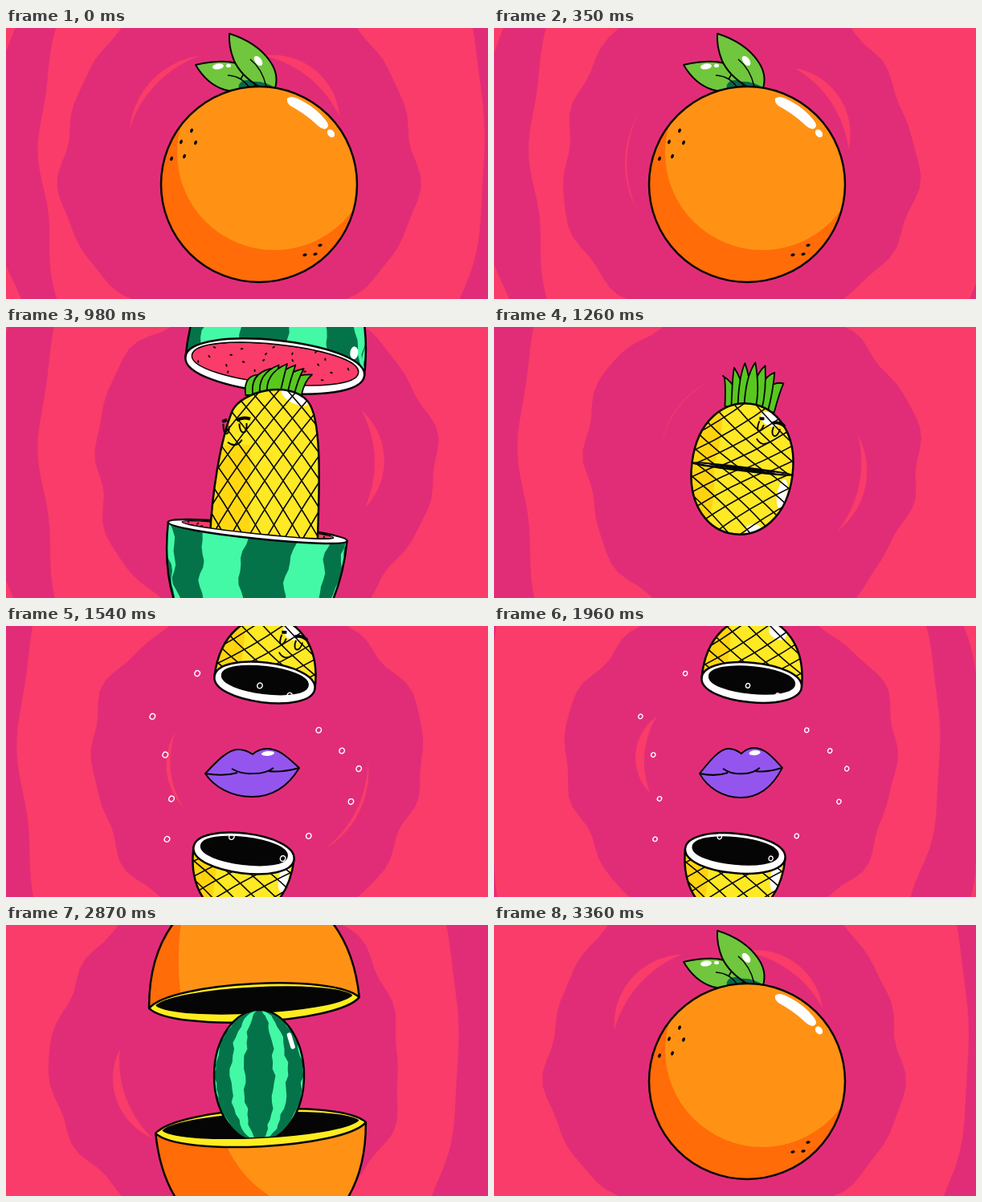
An HTML page with a canvas for the animation above (3.43 s loop, 600x338 px).

```html
<!DOCTYPE html>
<html lang="en">
<head>
<meta charset="utf-8">
<title>Fruit inside fruit</title>
<style>
html, body { margin: 0; width: 100%; height: 100%; overflow: hidden; background: #e12d78; }
canvas { display: block; width: 100vw; height: 100vh; }
</style>
</head>
<body>
<canvas id="stage" width="600" height="338"></canvas>
<script>
const c = document.getElementById('stage').getContext('2d');
const STEP = 70, STEPS = 49, TURN = Math.PI * 2;
const PINK = '#e12d78', CORAL = '#f93c69', INK = '#050505';
const MINT = '#43f9a6', PINE = '#05734a', YELLOW = '#ffe824', AMBER = '#ff9214', RUST = '#ff6c08';
const rad = deg => deg * Math.PI / 180;
const lerp = (a, b, k) => a + (b - a) * k;
const clamp = (v, lo, hi) => Math.max(lo, Math.min(hi, v));
const within = (s, a, b) => s >= a && s < b;
const noise = n => { const v = Math.sin(n * 127.1) * 43758.5; return v - Math.floor(v); };

function at(x, y, deg, draw, sx = 1, sy = sx) {
  c.save();
  c.translate(x, y);
  c.rotate(rad(deg));
  c.scale(sx, sy);
  draw();
  c.restore();
}
function paint(path, fill, width = 2.5, line = INK) {
  if (fill) { c.fillStyle = fill; c.fill(path); }
  if (width) { c.lineWidth = width; c.strokeStyle = line; c.stroke(path); }
}
function oval(x, y, rx, ry, fill, deg = 0) {
  const p = new Path2D();
  p.ellipse(x, y, rx, ry, rad(deg), 0, TURN);
  paint(p, fill, 0);
}
function clipped(path, draw) {
  c.save();
  c.clip(path);
  draw();
  c.restore();
}
const ink = (d, width = 2, line = INK) => paint(new Path2D(d), null, width, line);

/* Background: a drifting disc, two widening crescents and two flames */
const wave = (a, seed) => 5 * Math.sin(a * 5 + seed) + 3 * Math.sin(a * 11 + seed * 2) + 2 * Math.sin(a * 17 - seed);

function ring(p, x, r, tall, from, to, seed) {
  for (let i = 0; i <= 90; i++) {
    const a = lerp(from, to, i / 90), q = r + wave(a, seed);
    p.lineTo(x + q * Math.cos(a), 169 + q * tall * Math.sin(a));
  }
}
function flame(x, r, deg, w) {
  if (w <= 0) return;
  const p = new Path2D();
  for (let i = -20; i <= 20; i++) p.lineTo(...polar(x, r + w * (1 - i * i / 400), deg + i * 1.3));
  for (let i = 20; i >= -20; i--) p.lineTo(...polar(x, r, deg + i * 1.3));
  paint(p, CORAL, 0);
}
const polar = (x, r, deg) => [x + r * Math.cos(rad(deg)), 169 + r * Math.sin(rad(deg))];

function background(s) {
  const spin = s / STEPS * TURN, x = 298 + 23 * Math.cos(spin - 1.92);
  c.fillStyle = CORAL;
  c.fillRect(0, 0, 600, 338);
  for (const side of [0, 1]) {
    const age = (s + STEPS - 24 * side) % STEPS, mid = side ? 0 : Math.PI;
    const p = new Path2D();
    ring(p, x, 250 + 2.2 * age, 1.5, mid - 1, mid + 1, 2 + side);
    ring(p, x, 305 + 2.5 * age, 1.35, mid + 1, mid - 1, 4 + side);
    paint(p, PINK, 0);
  }
  const disc = new Path2D();
  ring(disc, x, 213 + 8 * Math.cos(spin), 1, 0, TURN, spin);
  paint(disc, PINK, 0);
  flame(x, 125 + 18 * Math.cos(spin), 192 + 32 * Math.cos(spin * 3), clamp(Math.abs(s - 12) - 5, 0, 12));
  const t = (s + 2) % STEPS;
  flame(x, 138, -58 + 3.5 * t, clamp(28 - t, 0, 12));
}

/* Shared decoration */
function stripes(w, d, lat0, turn, gap, half) {
  for (let k = -1; k < 3; k++) {
    const p = new Path2D(), n = 30;
    for (const side of [-1, 1])
      for (let i = 0; i <= n; i++) {
        const lat = lerp(lat0, 90, side < 0 ? i / n : 1 - i / n);
        const lon = clamp(turn + k * gap + side * half, -90, 90);
        const jag = w * .03 * (Math.sin(lat * .21 + k * 2 + side) + .6 * Math.sin(lat * .47 + k));
        p.lineTo((w * Math.sin(rad(lon)) + jag) * Math.cos(rad(lat)), d * Math.sin(rad(lat)));
      }
    paint(p, MINT, 0);
  }
}
function lattice(w, top, bottom, slope, gap) {
  const h = bottom - top, run = h / slope;
  for (let x = -w - run; x < w + run; x += gap)
    for (const m of [1, -1])
      ink(`M${m * x} ${top}Q${m * (x + run * .58)} ${top + h * .44} ${m * (x + run)} ${bottom}`, 1.6);
}
function crown(x, y, span, size, lean, fan) {
  for (const i of [0, 6, 1, 5, 2, 4, 3]) {
    const k = i / 3 - 1, bx = x + k * span / 2, b = span / 7;
    const tx = bx + lean + k * fan, ty = y - size * (1.1 - .45 * k * k);
    paint(new Path2D(`M${bx - b} ${y + 6}Q${bx - b * 1.5} ${y - size * .7} ${tx} ${ty}` +
      `Q${bx + b * 1.5} ${y - size * .4} ${bx + b} ${y + 6}Z`), '#58c81f', 1.8);
  }
}
function face(x, y, k, deg) {
  at(x, y, deg, () => {
    ink('M-15 -12L-9 -14M3 -12Q10 -17 20 -13', 4);
    ink('M-14 -9C-15 7 -7 7 -7 -6M6 -8C5 7 16 7 15 -8M-10 14Q0 23 8 12', 2);
  }, k);
}

/* Shells hang toward +y and are flipped for tops */
const shells = {
  orange: {
    open: 7, shut: 43, speed: 78, reach: 500, x: [320, 313], y: 175, eye: 176, view: .0023,
    wide: [118, 131], tilt: [-12, -3], rim: '#ffed1f', pit: INK, lens: .78, depth: 1.15, bulge: .93, skin: RUST,
    deco(w, d, up) {
      if (up) oval(.27 * w, .3 * w, .97 * w, 1.6 * w, AMBER);
      else oval(.67 * w, -.22 * w, 1.07 * w, 1.07 * w, AMBER);
    }
  },
  melon: {
    open: 12, shut: 38, speed: 103, reach: 500, x: [324, 315], y: 152, eye: 210, view: .0018,
    wide: [112, 60], tilt: [6, -3], rim: '#fff', pit: CORAL, lens: 1, depth: 1.5, bulge: 1, skin: PINE,
    deco(w, d, up) {
      stripes(w, d, 0, up ? 20 : -23, 62, 15);
      if (up) oval(.86 * w, .24 * w, 5, 8, '#fff');
    }
  },
  pine: {
    open: 18, shut: 36, speed: 56, reach: 213, x: [309, 312], y: 177, eye: 177, view: .0037,
    wide: [63, 62], tilt: [7, 4], rim: '#fff', pit: INK, lens: 1, depth: 1.3, bulge: 1, skin: YELLOW,
    deco(w, d, up) {
      oval(-w, d * .5, w * .5, d, '#ffd30f');
      if (up) oval(w * .42, d * .8, w * .19, 8, '#fff', -25);
      else {
        oval(w * .84, d * .3, 6, 18, '#fff', 4);
        oval(w * .36, d * .9, 10, 7, '#fff', -15);
      }
      lattice(w, -8, d + 4, .72, w * .48);
    }
  }
};
// Halves slide apart along a tilted axis; the rim opens with distance from eye level.
function pose(k, s, up) {
  const late = clamp((s - k.open - 4) / (k.shut - k.open - 6), 0, 1);
  const age = Math.max(0, Math.min(s - k.open, k.shut - s)), gap = Math.min(k.reach, k.speed * age);
  const tilt = lerp(...k.tilt, late), w = lerp(...k.wide, late), dir = up ? 1 : -1;
  const x = lerp(...k.x, late) + dir * gap / 2 * Math.sin(rad(tilt)), y = k.y - dir * gap / 2;
  const h = clamp(w * Math.abs(y - k.eye) * k.view, 2, w * .42);
  const ph = Math.max(h - 8, h * .55);
  return { x, y, tilt, w, h, up, d: w * k.depth, pw: Math.max(w * .65, w - 4 - 120 / h), ph, shift: dir * Math.min(3, (h - ph) / 2) };
}
const arc = (w, h, k, dir = 1, y = 0) => `C${-w * k * dir} ${y + h * 4 / 3} ${w * k * dir} ${y + h * 4 / 3} ${w * dir} ${y}`;
const inShell = (q, draw) => at(q.x, q.y, q.tilt, draw, 1, q.up ? -1 : 1);

function shellBack(k, q) {
  const { w, h, pw, ph, shift } = q;
  inShell(q, () => {
    paint(new Path2D(`M${-w} 0${arc(w, h, k.lens)}${arc(w, -h, k.lens, -1)}Z`), k.rim);
    const pit = new Path2D(`M${-pw} ${shift}${arc(pw, ph, k.lens, 1, shift)}${arc(pw, -ph, k.lens, -1, shift)}Z`);
    paint(pit, k.pit, 1.5);
    if (k === shells.melon) clipped(pit, () => {
      for (let i = 1; i < 26; i++) {
        const r = Math.sqrt(i / 27), a = i * 2.4;
        oval(pw * r * Math.cos(a), shift + ph * r * Math.sin(a), 1.9, 1, INK, i * 40);
      }
    });
  });
}
function shellFront(k, q, faced) {
  const { w, h, d, pw, ph, up, shift } = q;
  inShell(q, () => {
    paint(new Path2D(`M${-w} 0${arc(w, h, k.lens)}L${pw} ${shift}${arc(pw, ph, k.lens, -1, shift)}Z`), k.rim, 0);
    ink(`M${-pw} ${shift}${arc(pw, ph, k.lens, 1, shift)}`, 1.5);
    const crowned = k === shells.pine && up;
    if (crowned) at(0, d, 0, () => crown(0, 1, 48, 48, 0, 14), 1, -1);
    const body = new Path2D(`M${-w} 0${arc(w, h, k.lens)}${arc(w, d, k.bulge, -1)}Z`);
    paint(body, k.skin, 0);
    clipped(body, () => k.deco(w, d, up));
    paint(body, null);
    if (crowned && faced) at(0, 0, 0, () => face(w * .4, -d * .62, .95, 12), 1, -1);
  });
}
function pair(k, s, inner, faced) {
  const halves = [true, false].map(up => pose(k, s, up));
  halves.forEach(q => shellBack(k, q));
  inner();
  halves.forEach(q => shellFront(k, q, faced));
}

/* Whole fruit and lips */
function leaf(d, base, vein) {
  const p = new Path2D(d);
  paint(p, '#70c63c', 0);
  clipped(p, () => oval(...base, '#07694a', 20));
  paint(p, null, 2);
  ink(vein, 1.6);
}
function orange() {
  leaf('M236 46Q283 36 296 50Q308 62 311 75Q288 82 272 77Q250 70 236 46Z', [307, 77, 18, 11], 'M276 59Q294 60 303 75M292 64L296 57');
  leaf('M278 7Q313 18 329 42Q340 58 335 75L315 73Q293 60 284 41Q277 24 278 7Z', [322, 78, 22, 9], 'M304 39Q319 51 324 73');
  oval(264, 48, 7, 3.5, '#fff', -8);
  oval(277, 47, 3, 2.2, '#fff');
  oval(314, 41, 4, 7, '#fff', -38);
  const ball = new Path2D();
  ball.arc(315, 195, 122, 0, TURN);
  paint(ball, RUST, 0);
  clipped(ball, () => oval(334, 156, 121, 121, AMBER));
  paint(ball, null);
  paint(new Path2D('M350 88Q354 84 363 88Q388 100 400 118Q403 124 397 126Q392 126 384 118Q372 107 354 97Q349 93 350 88Z'), '#fff', 0);
  oval(404.5, 131.5, 4, 5.5, '#fff', -38);
  for (const [x, y] of [[231, 128], [218, 142], [236, 143], [222, 160], [206, 163]]) oval(x, y, 1.8, 2.8, INK, 25);
  for (const [x, y] of [[391, 271], [385, 282], [372, 283]]) oval(x, y, 2.7, 1.7, INK, -15);
}
function melon(s) {
  const big = s < 20, grow = big ? Math.min(1, .7 + (s - 7) / 10) : 1;
  const rx = (big ? 90 : 56) * grow, ry = (big ? 130 : 82) * grow;
  at(big ? 322 : 315, big ? 170 : 188, big ? -4 : 0, () => {
    const body = new Path2D();
    body.ellipse(0, 0, rx, ry, 0, 0, TURN);
    paint(body, PINE, 0);
    clipped(body, () => {
      if (big) {
        stripes(rx, ry, -90, -10, 70, 15);
        for (let i = 0; i < 12; i++)
          oval(rx * (noise(i + 1) * 1.3 - .65), ry * (i / 8 - .68), 11, 1.9, MINT, -9);
      } else stripes(rx, ry, -90, -29, 58, 10);
    });
    paint(body, null);
    const y = ry * (big ? -.34 : -.62), dy = ry * (big ? .32 : .18);
    c.lineCap = 'round';
    ink(`M${rx * (big ? .82 : .67)} ${y}l${rx * .08} ${dy}`, rx * .1, '#fff');
    c.lineCap = 'butt';
  });
}
function pineapple(s) {
  const early = s < 24, k = early ? Math.min(1, .72 + .14 * (s - 12)) : .55 - .07 * (s - 36);
  at(early ? 322 : 314, early ? 235 + 27 * Math.min(1, (s - 12) / 2) : 225, 0, () => {
    crown(11, -183, 54, 30, 17, 4);
    const body = new Path2D('M-68 0C-66 -50 -56 -120 -40 -158C-28 -182 30 -196 53 -170C72 -150 68 -60 66 0C66 30 50 40 0 40C-50 40 -68 30 -68 0Z');
    paint(body, YELLOW, 0);
    clipped(body, () => {
      c.fillStyle = '#ffd812';
      c.fillRect(-70, -115, 52, 160);
      oval(37, -174, 18, 7, '#fff', 28);
      lattice(70, -195, 45, 1.45, 23);
    });
    paint(body, null);
    if (early) face(-37, -133, 1, -4);
  }, k);
}
function lips(s) {
  const pop = clamp((s - 17) / 5, .2, 1), pinch = clamp((s - 22) / 12, 0, 1.4);
  at(306 + 2 * pinch, 183, 0, () => {
    paint(new Path2D('M-58 1C-44 -14 -30 -29 -17 -29Q-8 -29 1 -23Q9 -30 19 -30C34 -30 45 -19 59 -6C47 14 28 30 0 30C-25 30 -47 18 -58 1Z'), '#9455ef', 2);
    ink('M-58 1Q-35 5 -18 0M-25 -5Q-13 2 0 1Q16 2 27 -6M21 -2Q37 0 59 -6', 2);
    oval(20, -24, 8, 3, '#fff', -5);
    if (s > 28) {
      oval(-20, -26, 4, 2, '#fff');
      oval(12, -2, 1.8, 1.3, '#fff');
    }
  }, pop * (1 - .24 * pinch), pop * (1 + .07 * pinch));
}
function bubbles(s) {
  const out = clamp((s - 18) / 4, 0, 1) * clamp((36 - s) / 2, 0, 1);
  const size = out * (3.5 - 1.3 * clamp((s - 22) / 12, 0, 1));
  for (let i = 0; i < 14; i++) {
    const a = i * 2.4, r = out * (75 + 60 * noise(i + 3));
    const p = new Path2D();
    p.ellipse(306 + r * 1.1 * Math.cos(a), 178 + r * Math.sin(a), size * .9, size, .5, 0, TURN);
    if (size > .4) paint(p, null, 1.4, '#fff');
  }
}

function draw(s) {
  const { orange: rind, melon: husk, pine } = shells;
  c.lineJoin = 'round';
  background(s);
  if (!within(s, rind.open, rind.shut)) return orange();
  if (!within(s, husk.open, husk.shut)) return pair(rind, s, () => melon(s));
  pair(husk, s, () => {
    if (!within(s, pine.open, pine.shut)) return pineapple(s);
    pair(pine, s, () => lips(s), s < 28);
    bubbles(s);
  });
}

const start = performance.now();
function tick() {
  const time = Math.max(0, performance.now() - start);
  draw(Math.floor(time / STEP) % STEPS);
  requestAnimationFrame(tick);
}
tick();
</script>
</body>
</html>
```
